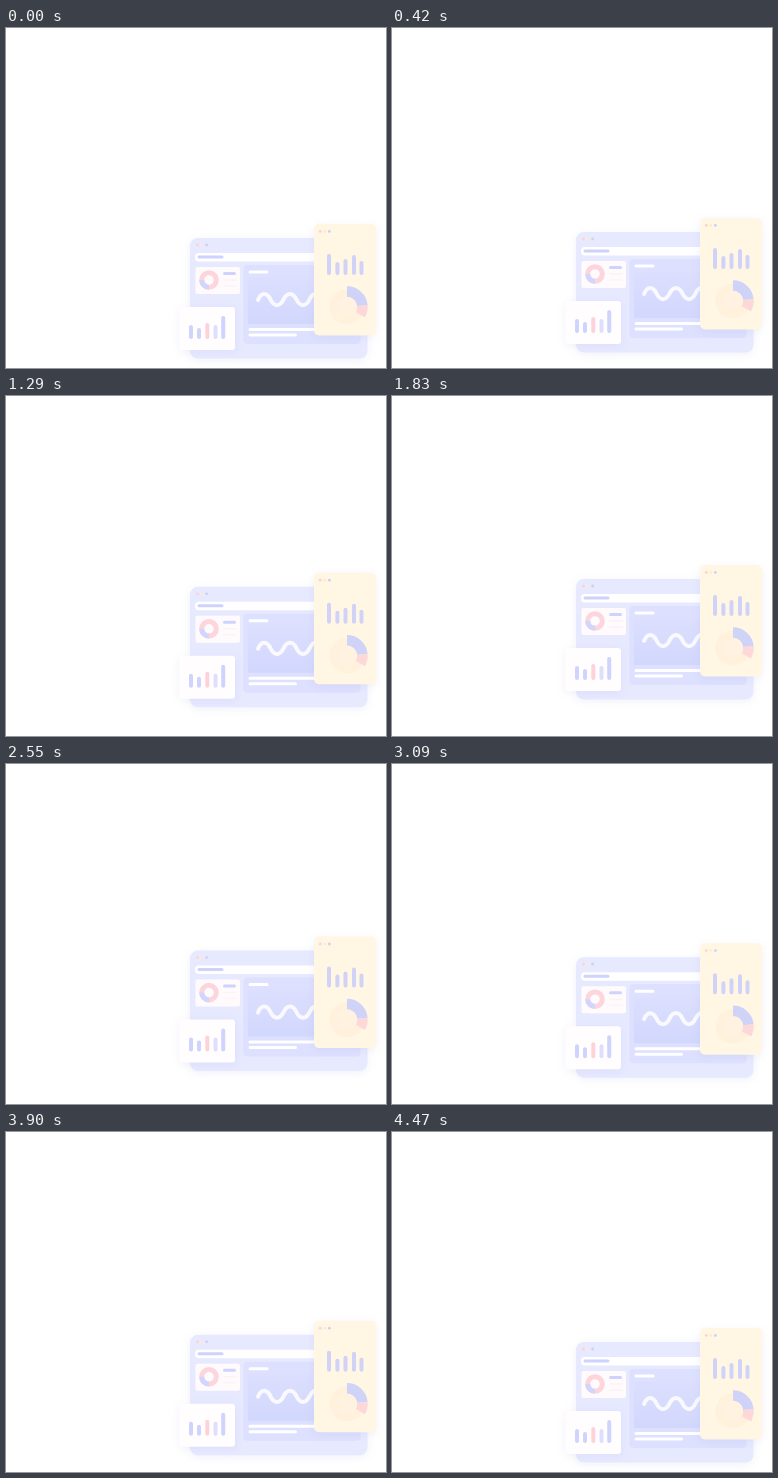
Animation of 380x340 px, one loop 4500 ms. Source, as an HTML page:

```html
<!DOCTYPE html>
<html lang="en">
<head>
<meta charset="utf-8">
<title>Floating dashboard</title>
<style>
html, body { margin: 0; width: 100%; height: 100%; overflow: hidden; background: #fff; }
svg { display: block; }
.line { fill: none; stroke-linecap: round; stroke-linejoin: round; }
.soft { filter: drop-shadow(0 2px 4px rgba(150, 155, 220, .13)); }
</style>
</head>
<body>
<svg width="380" height="340" viewBox="0 0 380 340">
  <defs>
    <linearGradient id="screen" x2="0" y2="1">
      <stop stop-color="#dcdffe"/>
      <stop offset="1" stop-color="#d2d7fd"/>
    </linearGradient>
    <g id="dots">
      <circle r="1.4" fill="#fdd2d6"/>
      <circle cx="4.6" r="1.4" fill="#ffebc8"/>
      <circle cx="9.2" r="1.4" fill="#cbd0fa"/>
    </g>
  </defs>

  <g id="scene">
    <!-- browser window -->
    <rect class="soft" x="184" y="210" width="177.5" height="120.5" rx="8" fill="#e7e9ff"/>
    <use href="#dots" x="191.4" y="217"/>
    <rect x="189" y="225" width="166" height="8.5" rx="4" fill="#fff"/>
    <path class="line" d="M193 229H216" stroke="#ced3fe" stroke-width="3"/>

    <!-- small donut card -->
    <rect x="189.5" y="239" width="44.5" height="27" rx="2" fill="#fffbfd"/>
    <circle cx="203" cy="252" r="7.3" fill="#fffafc" stroke="#fdd5dd" stroke-width="5"/>
    <path d="M195.7 252A7.3 7.3 0 0 0 203 259.3" fill="none" stroke="#d2d6fc" stroke-width="5"/>
    <path class="line" d="M218.5 245.5H228.5" stroke="#ced3fe" stroke-width="3"/>
    <path class="line" d="M218 252H230M218 258H230" stroke="#fdf2f5" stroke-width="1.5"/>

    <!-- wave chart -->
    <rect x="237.5" y="237" width="117" height="79" rx="4" fill="#dde0fe"/>
    <rect x="242" y="249" width="107" height="47" rx="1" fill="url(#screen)"/>
    <g class="line" stroke="#fff" stroke-width="3">
      <path d="M244 244H261M244 301.5H320M244 307H289.5"/>
      <path d="M252 272C255 264 261 264 264.5 271.5S274 279 277.5 271.5S287 264 290.5 271.5S300 279 303.5 271.5S310 266 314 266" stroke="#f9f9ff" stroke-width="4"/>
    </g>

    <!-- bar card -->
    <rect class="soft" x="173.5" y="279" width="55.5" height="43" rx="3" fill="#fffdfe"/>
    <g class="line" stroke="#cfd4fd" stroke-width="4">
      <path d="M185 299V309M193 302V309M217.2 290V309"/>
      <path d="M201.3 297V309" stroke="#fdd2d9"/>
      <path d="M209.5 299V309" stroke="#dddffd"/>
    </g>

    <!-- tall panel -->
    <rect class="soft" x="308" y="196" width="62" height="111.5" rx="5" fill="#fff6e4"/>
    <use href="#dots" x="314.2" y="203.4"/>
    <path class="line" d="M323 228V245M331.4 236V245M339.5 233V245M348 229V245M355.5 235V245" stroke="#d0d3f7" stroke-width="4"/>
    <g fill="none" stroke-width="10.5">
      <circle cx="341" cy="279" r="13.5" stroke="#fff1dc" stroke-width="8"/>
      <path d="M341 263.5A15.5 15.5 0 0 1 356.4 277.6" stroke="#d0d3f8"/>
      <path d="M356.4 277.6A15.5 15.5 0 0 1 354.4 286.8" stroke="#fdd8d8"/>
    </g>
    <circle cx="341" cy="279" r="10" fill="#fff2e0"/>
  </g>
</svg>
<script>
const scene = document.getElementById('scene');
const LOOP = 4500, TURN = 2000, STEPS = 50, STEP = 0.6;

// Steady rise, then a slower steady fall, in small steps.
function lift(t) {
  if (t < TURN) return Math.floor(t / 40);
  return Math.max(0, STEPS - Math.floor((t - TURN) / 49.4));
}

function draw() {
  const y = -STEP * lift(performance.now() % LOOP);
  scene.setAttribute('transform', `translate(0 ${y.toFixed(2)})`);
  requestAnimationFrame(draw);
}
draw();
</script>
</body>
</html>
```
